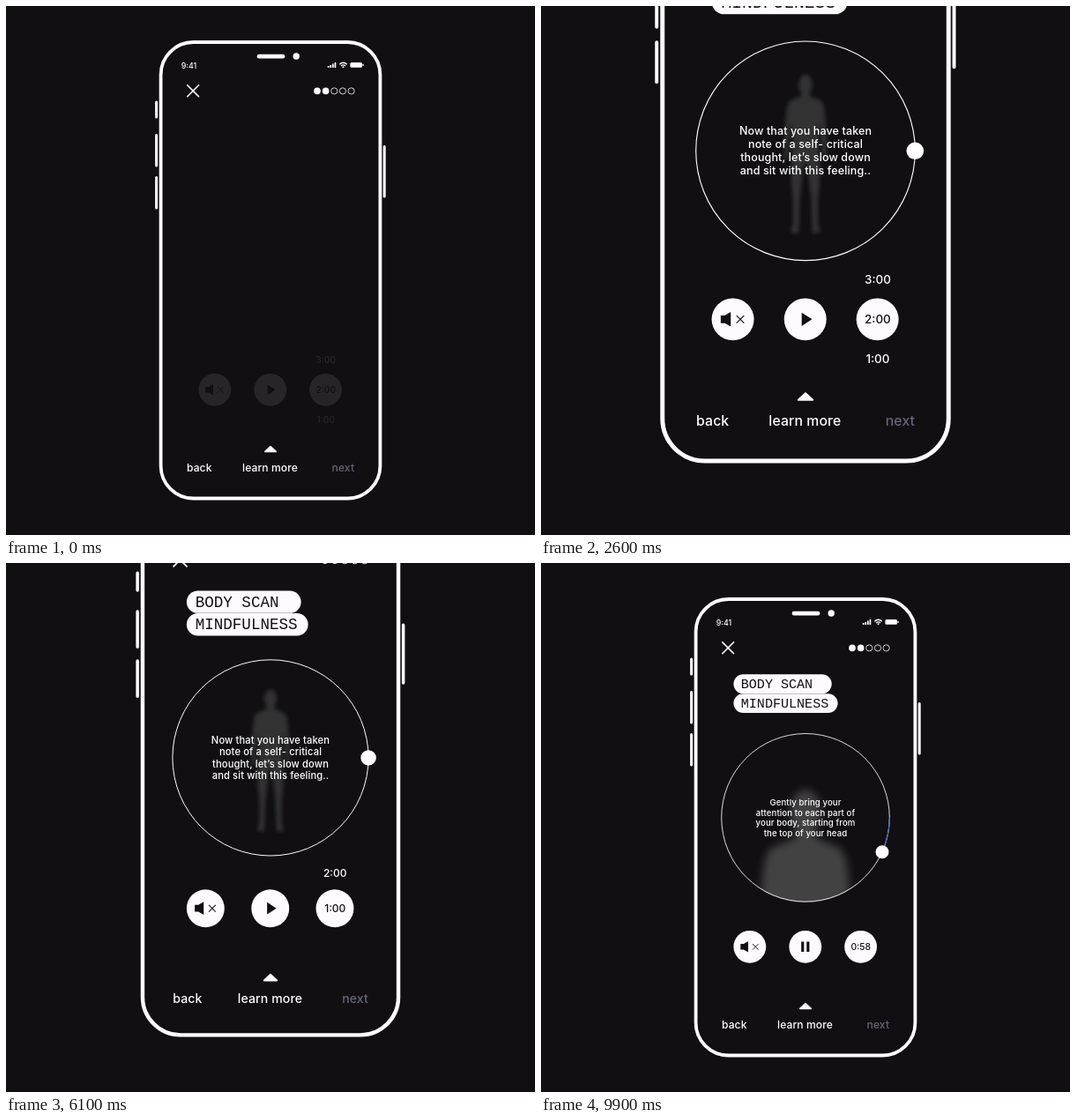
An HTML page for the animation above (10 s loop, 600 by 600 pixels).

```html
<!DOCTYPE html>
<html lang="en">
<head>
<meta charset="utf-8">
<title>Body scan</title>
<style>
  html, body { margin: 0; width: 100%; height: 100%; overflow: hidden; background: #110f12; }
  svg { display: block; width: 100vw; height: 100vh; }
  text { font-family: Inter, "Open Sans", sans-serif; font-weight: 500; fill: #fff; }
  .mid { text-anchor: middle; }
  .copy { font-size: 9.6px; letter-spacing: .09px; text-anchor: middle; }
  .time { font-size: 10.3px; text-anchor: middle; }
  .nav { font-size: 12.1px; letter-spacing: .08px; }
  .title text { font: 400 15.07px "Liberation Mono", "DejaVu Sans Mono", monospace; fill: #110f12; }
  .dark, .dark text { fill: #110f12; }
  .line { fill: none; stroke: #fff; }
</style>
</head>
<body>
<svg viewBox="0 0 600 600">
  <defs>
    <filter id="soft" filterUnits="userSpaceOnUse" x="-32" y="-22" width="64" height="166">
      <feGaussianBlur stdDeviation="1.6"/>
    </filter>
    <clipPath id="dialClip"><circle cx="300" cy="288.8" r="96.3"/></clipPath>
    <clipPath id="timerClip"><circle cx="362.6" cy="435.3" r="18.4"/></clipPath>
    <path id="half" d="M0 4H3.2L4 10L12 13Q15.5 14.5 16.5 22L18.5 45L18.3 64Q16.5 68 15 63L13.5 44L12 32L11 48L12.3 64L12.3 86L10.8 100L10.8 120L13 128L6 129.5L5 100L1.6 70L0 67Z"/>
  </defs>

  <g id="phone">
    <rect class="line" x="175.6" y="41" width="248.8" height="517.5" rx="37" stroke-width="3.8"/>
    <path class="line" stroke-width="3" stroke-linecap="round"
      d="M170.6 109V126M170.6 146.5V181M170.6 194.5V229M429.2 159.5V216"/>
    <rect x="284.7" y="54.8" width="31.6" height="4.7" rx="2.3" fill="#fff"/>
    <circle cx="329.2" cy="57" r="3.7" fill="#fff"/>

    <text x="198.7" y="71.2" font-size="8.9">9:41</text>
    <path fill="#fff" d="M364.8 68h1.7v2h-1.7zM367.4 67h1.7v3h-1.7zM370 65.5h1.7v4.5h-1.7zM372.6 64h1.7v6h-1.7z"/>
    <path class="line" stroke-width="1.3" d="M378.3 66.2Q382.5 62.4 386.7 66.2M380 68Q382.5 65.8 385 68"/>
    <circle cx="382.5" cy="69.2" r="1" fill="#fff"/>
    <rect x="390.4" y="64" width="13.6" height="5.8" rx="1.6" fill="#fff"/>
    <rect x="404.5" y="65.8" width="1.2" height="2.2" rx=".5" fill="#fff"/>
    <path class="line" stroke-width="1.5" d="M205.3 89.4L219 103.1M219 89.4L205.3 103.1"/>
    <g id="steps"></g>

    <path fill="#fff" stroke="#fff" stroke-width="1.6" stroke-linejoin="round" d="M293.8 505.4L300 499.6L306.2 505.4Z"/>
    <text class="nav" x="205" y="527.5">back</text>
    <text class="nav mid" x="299.5" y="527.5">learn more</text>
    <text class="nav" x="395.1" y="527.5" text-anchor="end" style="fill:#656779">next</text>

    <g id="title" class="title">
      <rect x="218.4" y="126.3" width="111.3" height="21.8" rx="10.9" fill="#fdfbfe"/>
      <rect x="218.4" y="148.2" width="118.2" height="21.8" rx="10.9" fill="#fdfbfe"/>
      <text x="226.8" y="142.2">BODY SCAN</text>
      <text x="226.8" y="164.1">MINDFULNESS</text>
    </g>

    <g id="dial">
      <g clip-path="url(#dialClip)">
        <g id="body" filter="url(#soft)">
          <ellipse rx="6" ry="9"/>
          <use href="#half"/>
          <use href="#half" transform="scale(-1 1)"/>
        </g>
      </g>
      <circle class="line" cx="300" cy="288.8" r="95.3" stroke-width=".85"/>
      <path id="trail" fill="none" stroke="#3d6fc4" stroke-width="1.1"/>
      <circle id="knob" r="7.5" fill="#fff"/>
    </g>
    <g id="intro" class="copy"></g>
    <g id="guide" class="copy"></g>

    <g id="controls">
      <g id="outerTimes"></g>
      <g fill="#fdfbfe">
        <circle cx="236.8" cy="435.3" r="18.4"/>
        <circle cx="299.8" cy="435.3" r="18.4"/>
        <circle cx="362.6" cy="435.3" r="18.4"/>
      </g>
      <path class="dark" d="M226.3 432H229.8L235 428.9V441.6L229.8 438.6H226.3Z"/>
      <path fill="none" stroke="#110f12" stroke-width=".9" d="M240 432L246.6 438.6M246.6 432L240 438.6"/>
      <path id="play" class="dark" d="M296.7 429.4L305.7 435.3L296.7 441.2Z"/>
      <path id="pause" class="dark" d="M295.2 429.6h3.1v11.4h-3.1zM301.3 429.6h3.1v11.4h-3.1z"/>
      <g clip-path="url(#timerClip)"><g id="innerTimes" class="dark"></g></g>
    </g>
    <circle id="touch" fill="#fff" fill-opacity=".18"/>
  </g>
</svg>

<script>
const LOOP = 10000, PIVOT_Y = 698, STEP = 34.4;
const DIAL = { x: 300, y: 288.8, r: 95.3 };
const $ = id => document.getElementById(id);
const set = (node, attrs) => {
  for (const key in attrs) node.setAttribute(key, attrs[key]);
  return node;
};
const add = (parent, tag, attrs, content = "") => {
  const node = set(document.createElementNS("http://www.w3.org/2000/svg", tag), attrs);
  node.textContent = content;
  return parent.appendChild(node);
};
const clamp = v => Math.min(1, Math.max(0, v));
const ease = (t, from, to) => {
  const u = clamp((t - from) / (to - from));
  return u * u * (3 - 2 * u);
};
const mix = (a, b, u) => a + (b - a) * u;

for (let i = 0; i < 5; i++) {
  add($("steps"), "circle", {
    cx: 353 + i * 9.65, cy: 96.4, r: i < 2 ? 3.8 : 3.6,
    fill: i < 2 ? "#fff" : "none", stroke: i < 2 ? "none" : "#fff", "stroke-width": .8
  });
}

const addCopy = (id, lines) => lines.forEach((line, i) =>
  add($(id), "text", { x: 300, y: 275 + i * 11.5 }, line));
addCopy("intro", ["Now that you have taken", "note of a self- critical", "thought, let’s slow down", "and sit with this feeling.."]);
addCopy("guide", ["Gently bring your", "attention to each part of", "your body, starting from", "the top of your head"]);

const addTimes = id => ["3:00", "2:00", "1:00"].map(label =>
  add($(id), "text", { class: "time", x: 362.8 }, label));
const outerTimes = addTimes("outerTimes"), innerTimes = addTimes("innerTimes");

function drawTimes(t) {
  const scroll = ease(t, 4450, 5050), started = ease(t, 6800, 7050);
  outerTimes.forEach((node, i) => {
    const offset = i - 1 - scroll;
    const opacity = clamp(2 - Math.abs(offset)) * (offset < -.5 ? 1 - started : 1);
    set(node, { y: 439 + offset * STEP, opacity });
    set(innerTimes[i], { y: 439 + offset * STEP });
  });
  innerTimes[2].textContent = t < 8100 ? "1:00" : t < 9100 ? "0:59" : "0:58";
}

function drawDial(t) {
  const angle = Math.max(0, t - 7020) * 8.37e-3 * Math.PI / 180;
  const x = DIAL.x + DIAL.r * Math.cos(angle), y = DIAL.y + DIAL.r * Math.sin(angle);
  set($("knob"), { cx: x, cy: y });
  set($("trail"), { d: `M${DIAL.x + DIAL.r} ${DIAL.y}A${DIAL.r} ${DIAL.r} 0 0 1 ${x} ${y}` });

  const near = ease(t, 7000, 8800), shade = Math.round(mix(48, 66, near));
  set($("body"), {
    transform: `translate(300 ${231.5 + 52 * near * near}) scale(${1 + 1.9 * near})`,
    fill: `rgb(${shade},${shade},${shade})`
  });
}

function drawTouch(t) {
  let x = 300, y = 435.3, size = ease(t, 6150, 6450) * (1 - ease(t, 6750, 7050));
  if (t < 6000) {
    const reach = ease(t, 3470, 4220);
    x = mix(300, 362.5, reach);
    y = mix(505, 435, reach) - 37 * ease(t, 4450, 5050);
    size = ease(t, 3300, 3520) * (1 - ease(t, 5200, 5720));
  }
  set($("touch"), { cx: x, cy: y, r: 21.4 * size });
}

function draw(t) {
  const zoom = 1 + .357 * (ease(t, 1557, 2935) - ease(t, 5277, 6851));
  set($("phone"), { transform: `translate(300 ${PIVOT_Y}) scale(${zoom}) translate(-300 ${-PIVOT_Y})` });

  set($("controls"), { opacity: ease(t, -130, 570) });
  set($("title"), { opacity: ease(t, 80, 700) });
  set($("dial"), { opacity: ease(t, 80, 700) });
  set($("intro"), { opacity: ease(t, 200, 850) * (1 - ease(t, 6750, 7000)) });
  set($("guide"), { opacity: ease(t, 7000, 7350) });
  set($("play"), { opacity: t < 6800 ? 1 : 0 });
  set($("pause"), { opacity: t < 6800 ? 0 : 1 });

  drawTimes(t);
  drawDial(t);
  drawTouch(t);
}

const start = performance.now();
function tick() {
  draw((performance.now() - start) % LOOP);
  requestAnimationFrame(tick);
}
tick();
</script>
</body>
</html>
```
